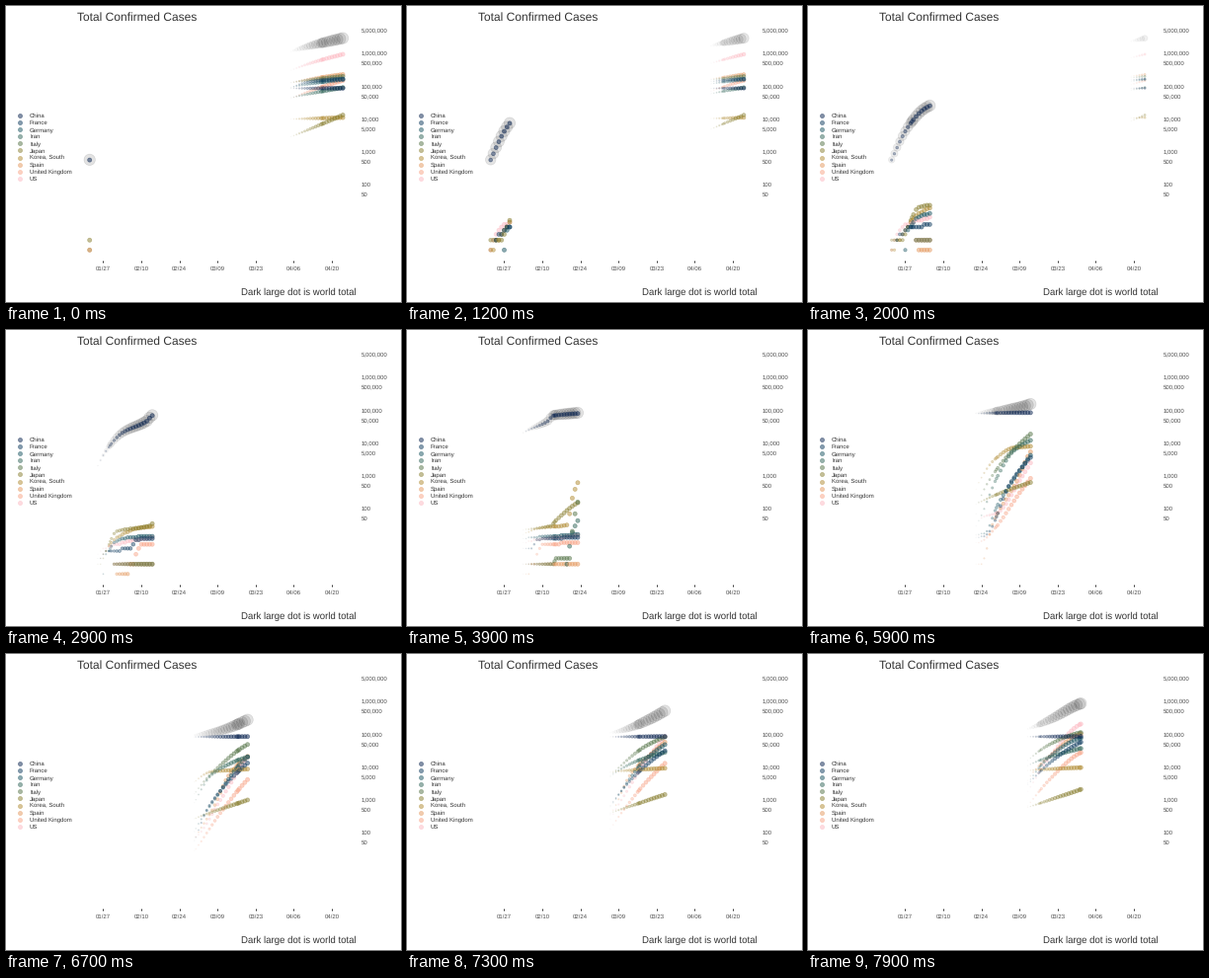
A matplotlib script for the animation above (8000 ms loop, 400x300 px).

```python
import numpy as np
import matplotlib.pyplot as plt
from matplotlib.animation import FuncAnimation
from matplotlib.colors import to_rgb

W, H, DPI = 400, 300, 100
PX = 72 / DPI                 # points per pixel
LAST_DAY = 93                 # day 0 is 22 January
CYCLE = 100                   # animation states in the full run
WAKE = 22                     # states that stay visible behind the head
HOLD = 5                      # extra frames on the first state
INK, GREY = "#333333", "#4D4D4D"

plt.rcParams["font.family"] = "Liberation Sans"
plt.rcParams["text.hinting"] = "none"

days = np.arange(LAST_DAY + 1)
day_state = np.round(days * (CYCLE - 1) / LAST_DAY)


def x_of(day):
    return 84.7 + 2.757 * day


def y_of(log_cases):
    return 47.5 + 33.3 * (6 - log_cases)


def rise(x, xk, yk):
    """Smooth curve through rising key points, without overshoot."""
    h = np.diff(xk)
    s = np.diff(yk) / h
    mid = 2 * s[:-1] * s[1:] / (s[:-1] + s[1:] + 1e-9)
    first = max(0, (3 * s[0] - mid[0]) / 2)
    last = max(0, (3 * s[-1] - mid[-1]) / 2)
    m = np.concatenate([[first], mid, [last]])
    i = np.clip(np.searchsorted(xk, x, side="right") - 1, 0, len(h) - 1)
    t = (x - xk[i]) / h[i]
    bend = (m[i] - s[i]) * t * (1 - t) ** 2 - (m[i + 1] - s[i]) * t ** 2 * (1 - t)
    return yk[i] + s[i] * h[i] * t + h[i] * bend


class Series:
    def __init__(self, name, color, radius, alpha, counts):
        self.name, self.rgb = name, to_rgb(color)
        self.radius, self.alpha, self.counts = radius, alpha, counts
        self.days = days[counts > 0]
        self.log = np.log10(counts[counts > 0])

    def at(self, day):
        return np.interp(day, self.days, self.log, left=np.nan)


def country(name, color, *keys):
    """Whole case counts grown through (day, cases) key points."""
    day, cases = np.array(keys, float).T
    counts = np.round(10 ** rise(days, day, np.log10(cases)))
    return Series(name, color, 2.05, 0.5, np.where(days >= day[0], counts, 0))


countries = [
    country("China", "#0A2450", (0, 548), (6, 5509), (12, 19716),
            (21, 44759), (23, 66358), (39, 79900), (93, 83884)),
    country("France", "#0E3B5F", (2, 2), (7, 5), (15, 6), (17, 11), (34, 14),
            (44, 656), (58, 12758), (69, 52827), (81, 133670), (93, 159952)),
    country("Germany", "#1A5562", (5, 1), (6, 4), (12, 12), (34, 17),
            (39, 130), (46, 1040), (58, 19848), (69, 71808), (93, 154999)),
    country("Iran", "#32675A", (28, 2), (30, 18), (33, 61), (39, 978),
            (45, 5823), (58, 19644), (93, 88194)),
    country("Italy", "#567549", (9, 2), (29, 3), (30, 20), (32, 155),
            (39, 1694), (47, 9172), (58, 47021), (69, 105792), (93, 192994)),
    country("Japan", "#8A8032", (0, 2), (3, 2), (10, 20), (22, 29), (24, 43),
            (32, 147), (58, 963), (69, 1953), (93, 12829)),
    country("Korea, South", "#B28D35", (0, 1), (3, 2), (9, 11), (18, 25),
            (28, 31), (30, 204), (32, 602), (38, 3150), (45, 7041),
            (93, 10718)),
    country("Spain", "#E59A60", (10, 1), (22, 2), (33, 2), (37, 32),
            (46, 673), (51, 5232), (58, 20410), (69, 95923), (93, 219764)),
    country("United Kingdom", "#F9A588", (9, 2), (15, 2), (19, 8), (32, 9),
            (37, 20), (48, 384), (58, 4014), (69, 25481), (93, 144640)),
    country("US", "#FDB9C2", (0, 1), (4, 5), (10, 8), (20, 12), (32, 15),
            (33, 51), (39, 74), (48, 959), (58, 19100), (69, 188172),
            (93, 905358)),
]

# The rest of the world adds a share that grows with time.
share = 1.01 + 0.41 * (days / LAST_DAY) ** 2.5
world = Series("World", "black", 5.7, 0.11,
               share * sum(c.counts for c in countries))

fig = plt.figure(figsize=(W / DPI, H / DPI), dpi=DPI, facecolor="white")
ax = fig.add_axes([0, 0, 1, 1])
ax.set_xlim(0, W)
ax.set_ylim(H, 0)
ax.axis("off")


def label(x, y, text, size, ha="left", color=INK):
    ax.text(x, y, text, fontsize=size * PX, ha=ha, va="baseline", color=color)


def area(radius):
    return (2 * np.asarray(radius) * PX) ** 2


def dots(x=(), y=(), **style):
    return ax.scatter(x, y, linewidths=0.7 * PX, **style)


label(72, 15, "Total Confirmed Cases", 12.05)
label(354.5, 293.2, "Dark large dot is world total", 9.6, "right")

for i, date in enumerate(["01/27", "02/10", "02/24", "03/09", "03/23",
                          "04/06", "04/20"]):
    x = x_of(5 + 14 * i)
    ax.plot([x, x], [257.5, 260.2], color=INK, lw=PX, solid_capstyle="butt")
    label(x, 267.6, date, 6, "center", GREY)

for power in range(1, 7):
    for lead in (1, 5):
        value = lead * 10 ** power
        if value >= 50:
            label(359.5, y_of(np.log10(value)) + 2.2, f"{value:,}", 6,
                  color=GREY)

for i, c in enumerate(countries):
    y = 110.9 + 7.1 * i
    rgba = [(*c.rgb, c.alpha)]
    dots([13.6], [y], s=area(c.radius), facecolors=rgba, edgecolors=rgba)
    label(24, y + 2.2, c.name, 6)

layers = [(dots(), [world]), (dots(), countries[::-1])]


def draw(frame):
    state = max(0, frame - HOLD)
    for art, group in layers:
        pos, sizes, colors = [], [], []
        for age in range(WAKE - 1, -1, -1):
            day = np.interp((state - age) % CYCLE, day_state, days)
            fade = 1 - (age / WAKE) ** 2.2
            for s in group:
                log = s.at(day)
                if np.isfinite(log):
                    pos.append((x_of(day), y_of(log)))
                    sizes.append(area(s.radius * fade))
                    colors.append((*s.rgb, s.alpha * fade))
        art.set_offsets(pos)
        art.set_sizes(sizes)
        art.set_facecolors(colors)
        art.set_edgecolors(colors)
    return [art for art, _ in layers]


anim = FuncAnimation(fig, draw, frames=80, interval=100, repeat=True,
                     repeat_delay=0, blit=False)
plt.show()
```
